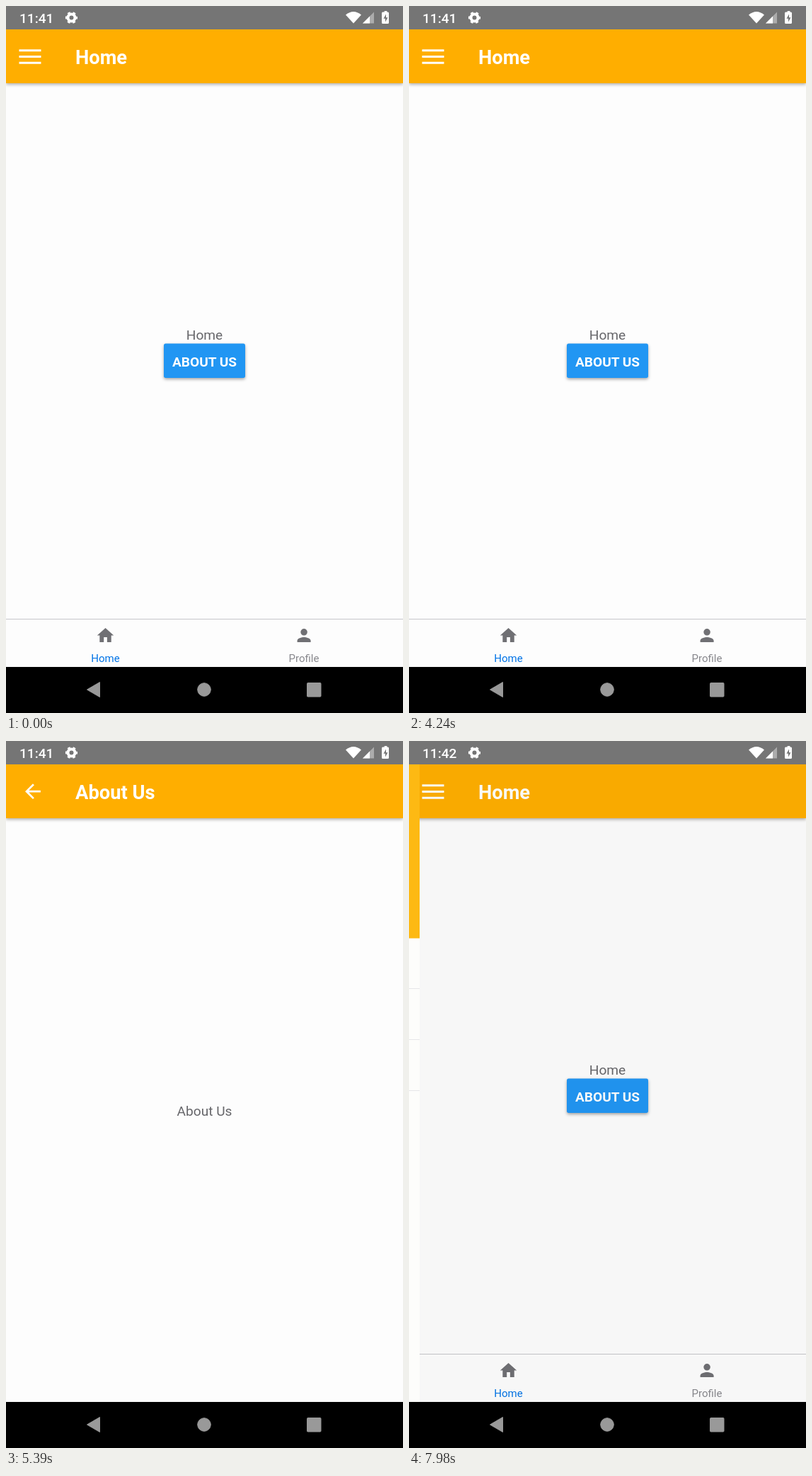
Animation, 561 px wide and 998 px high, one loop 8 s. Source, as an HTML page:

```html
<!DOCTYPE html>
<html lang="en">
<head>
<meta charset="utf-8">
<title>Drawer, tabs and stack navigation</title>
<style>
  html, body { margin: 0; width: 100%; height: 100%; overflow: hidden; background: #000; }
  svg { display: block; }
  text { font: 19.1px Roboto, sans-serif; fill: #66666a; }
  .mid { text-anchor: middle; }
  .title { font-size: 27.3px; font-weight: 700; fill: #fff; }
  .caps { font-weight: 700; fill: #fff; }
  .tab { font-size: 15px; fill: #88888d; }
  .tab.on { fill: #0073e6; }
  .clock { font-weight: 500; fill: #fff; }
  .bar { fill: #ffae00; filter: drop-shadow(0 2px 2px rgba(0, 0, 0, .3)); }
  .button { fill: #2196f3; filter: drop-shadow(0 2px 2px rgba(0, 0, 0, .35)); }
  .page { fill: #fdfdfd; }
  .icon { fill: #707074; }
  .white { fill: #fff; }
</style>
</head>
<body>
<svg width="561" height="998" viewBox="0 0 561 998">
  <clipPath id="buttonClip"><rect x="223" y="476.5" width="115" height="48.5" rx="2.7"/></clipPath>

  <svg y="33" width="561" height="900" viewBox="0 33 561 900">
    <!-- tab screens -->
    <rect class="page" y="33" width="561" height="900"/>
    <g id="home">
      <text class="mid" x="280.5" y="471">Home</text>
      <rect class="button" x="223" y="476.5" width="115" height="48.5" rx="2.7"/>
      <circle id="press" cx="306" cy="511" fill="#000" opacity=".12" clip-path="url(#buttonClip)"/>
      <text class="mid caps" x="280.5" y="508.5">ABOUT US</text>
    </g>
    <text id="profile" class="mid" x="280.5" y="495">Profile</text>
    <rect y="865" width="561" height="1" fill="#c6c6ca"/>
    <path class="icon" transform="translate(126.5 874.5) scale(1.17)" d="M10 20v-6h4v6h5v-8h3L12 3 2 12h3v8z"/>
    <path class="icon" transform="translate(406.8 874.3) scale(1.19)" d="M12 12a4 4 0 1 0 0-8 4 4 0 0 0 0 8zm0 2c-2.67 0-8 1.34-8 4v2h16v-2c0-2.66-5.33-4-8-4z"/>
    <text id="homeTab" class="mid tab" x="140.5" y="926">Home</text>
    <text id="profileTab" class="mid tab" x="421" y="926">Profile</text>
    <rect class="bar" y="33" width="561" height="76"/>
    <path d="M18.5 62.8h31M18.5 71.5h31M18.5 80.2h31" stroke="#fff" stroke-width="3.1"/>
    <text class="title" x="98" y="81.5">Home</text>

    <!-- pushed screen -->
    <g id="about">
      <g id="aboutCard">
        <rect class="page" y="33" width="561" height="900"/>
        <rect class="bar" y="33" width="561" height="76"/>
        <path class="white" transform="translate(21.6 54.8) scale(1.364)" d="M20 11H7.83l5.59-5.59L12 4l-8 8 8 8 1.41-1.41L7.83 13H20z"/>
        <text class="title" x="98" y="81.5">About Us</text>
        <text class="mid" x="280.5" y="529">About Us</text>
      </g>
      <circle id="backPress" cx="38" cy="71" opacity=".2"/>
    </g>

    <!-- drawer -->
    <rect id="shade" y="33" width="561" height="900"/>
    <g id="drawer">
      <rect y="33" width="382" height="900" fill="#fdfdfb"/>
      <rect y="33" width="382" height="245.5" fill="#fdb913"/>
      <path d="M0 349.5h382M0 421.5h382M0 493.5h382" stroke="#e6e6e8"/>
    </g>
  </svg>

  <!-- status bar -->
  <rect width="561" height="33" fill="#757575"/>
  <text id="clock" class="clock" x="19" y="24">11:41</text>
  <g fill="none" stroke="#fff">
    <circle cx="92.5" cy="16.5" r="5" stroke-width="4"/>
    <circle cx="92.5" cy="16.5" r="7.2" stroke-width="2.8" stroke-dasharray="3.77" stroke-dashoffset="1.9"/>
  </g>
  <path class="white" d="M480 12.5Q491 3.5 502 12.5L491 24.5z"/>
  <path class="white" opacity=".4" d="M520 8.5v16h-16z"/>
  <path class="white" d="M514 14.5v10h-10z"/>
  <path class="white" d="M533.5 8.5h1.2V7h3.6v1.5h1.2q1.5 0 1.5 1.5v13.500q0 1.500-1.500 1.500h-7q-1.500 0-1.500-1.500V10q0-1.500 1.500-1.500z"/>
  <path d="M537 11.500l-3.500 6.200h2.500v4.800l3.500-6.300H537z" fill="#757575"/>

  <!-- navigation bar -->
  <rect y="933" width="561" height="65"/>
  <g fill="#999" stroke="#999" stroke-linejoin="round">
    <path d="M114.500 965l18-10.500v21z"/>
    <circle cx="280" cy="965" r="9.300"/>
    <rect x="425.500" y="955.500" width="19.500" height="19.500" rx="1"/>
  </g>
</svg>
<script>
  const LOOP = 8000, STEP = 40, DRAWER_WIDTH = 382, SLIDE = 72;
  const $ = id => document.getElementById(id);
  const clamp = x => Math.min(1, Math.max(0, x));
  const show = (id, on) => $(id).setAttribute('display', on ? 'inline' : 'none');
  const set = (id, name, value) => $(id).setAttribute(name, value);

  // Critically damped spring, stiffness 1000 and mass 3
  function spring(ms) {
    const x = Math.max(0, ms) / 1000 * Math.sqrt(1000 / 3);
    return 1 - (1 + x) * Math.exp(-x);
  }

  // The screen refreshes every 40 ms, counted from the start of each action
  function snap(t) {
    const start = [7980, 6790, 5060, 0].find(s => t >= s);
    return start + Math.floor((t - start) / STEP) * STEP;
  }

  function fadeIn(p) {
    if (p < .5) return p / 2;
    if (p < .9) return .25 + (p - .5) * 1.125;
    return .7 + (p - .9) * 3;
  }

  function draw(now) {
    const raw = now % LOOP, t = snap(raw);

    const profile = t >= 2840 && t < 4240;
    show('home', !profile);
    show('profile', profile);
    $('homeTab').classList.toggle('on', !profile);
    $('profileTab').classList.toggle('on', profile);
    $('clock').textContent = raw < 7690 ? '11:41' : '11:42';

    const closing = t > 6930;
    const p = closing ? 1 - clamp((t - 6930) / 150)
                      : 1 - (1 - clamp((t - 5044) / 350)) ** 5;
    show('about', t >= 5060 && t < 7070);
    set('about', 'transform', `translate(0 ${SLIDE * (1 - p)})`);
    set('aboutCard', 'opacity', closing ? p : fadeIn(p));

    show('press', t >= 5060 && t < 5400);
    set('press', 'r', 35 + Math.max(0, t - 5060) * .3);
    show('backPress', t >= 6790);
    set('backPress', 'r', Math.min(29, 14 + Math.max(0, t - 6790) * .15));

    const open = spring(t - 22) - spring(t - 950) + spring(t - 7963);
    set('shade', 'opacity', open * .6);
    set('drawer', 'transform', `translate(${DRAWER_WIDTH * (open - 1)} 0)`);
  }

  const begin = performance.now();
  function frame() {
    draw(performance.now() - begin);
    requestAnimationFrame(frame);
  }
  frame();
</script>
</body>
</html>
```
